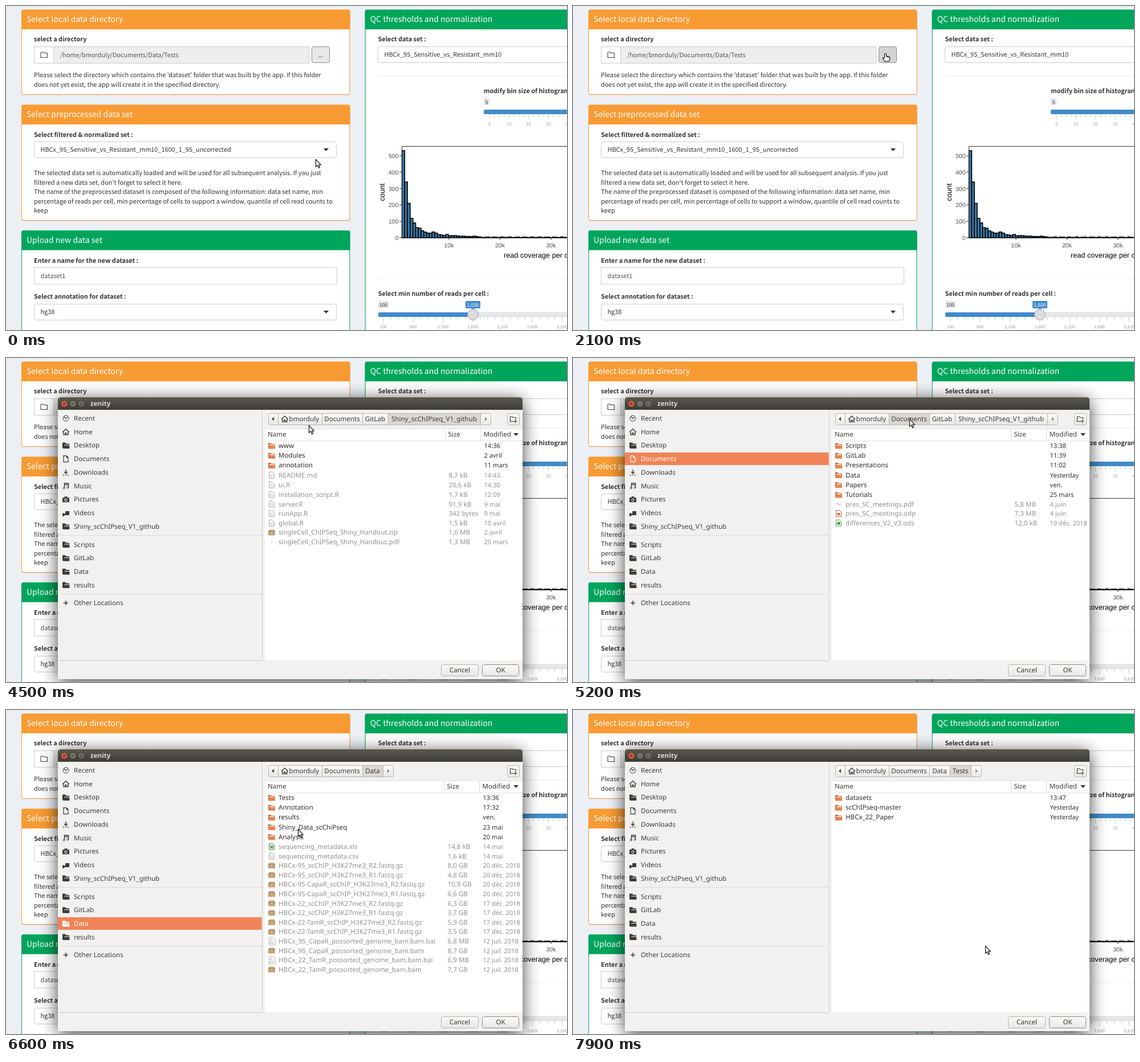
An HTML page that plays this animation: 984x569 px, repeating every 8 s.

```html
<!DOCTYPE html>
<html lang="en">
<head>
<meta charset="utf-8">
<style>
html, body { margin: 0; width: 100%; height: 100%; overflow: hidden; background: #ecf0f5; }
svg { display: block; width: 984px; height: 569px; }
text { white-space: pre; text-rendering: geometricPrecision; }
.web { font-family: "Noto Sans CJK JP", "Noto Sans CJK SC", "Noto Sans", sans-serif; font-size: 10.91px; fill: #333; }
.plot { font-family: "Liberation Sans", Arial, sans-serif; font-size: 10.5px; fill: #4d4d4d; }
.gtk { font-family: "Noto Sans", sans-serif; font-size: 11.6px; fill: #3c3b37; }
.shadow { filter: drop-shadow(0 5px 15px rgba(0, 0, 0, .75)); }
</style>
</head>
<body>
<svg viewBox="0 0 984 569">
  <defs>
    <linearGradient id="title" x2="0" y2="1"><stop stop-color="#5b5850"/><stop offset="1" stop-color="#3d3c38"/></linearGradient>
    <linearGradient id="button" x2="0" y2="1"><stop stop-color="#fbfaf9"/><stop offset="1" stop-color="#e9e7e5"/></linearGradient>
  </defs>
  <g id="page" class="web"></g>
  <g id="browse" class="web"></g>
  <g id="dialog" class="gtk"></g>
  <g id="cursor"></g>
</svg>
<script>
const $ = id => document.getElementById(id);
const USER = 'bmorduly';
const ORANGE = '#f89b33', GREEN = '#00a55c', BLUE = '#428bca', INK = '#3c3b37';

const rect = (x, y, w, h, fill, more = '') =>
  `<rect x="${x}" y="${y}" width="${w}" height="${h}" fill="${fill}" ${more}/>`;
const frame = (x, y, w, h, fill, stroke, r = 0) =>
  rect(x + .5, y + .5, w - 1, h - 1, fill, `stroke="${stroke}" rx="${r}"`);
const path = (d, fill, stroke = 'none', width = 1) =>
  `<path d="${d}" fill="${fill}" stroke="${stroke}" stroke-width="${width}"/>`;
const line = (d, stroke, width = 1) => path(d, 'none', stroke, width);
const circle = (x, y, r, fill, stroke = 'none') =>
  `<circle cx="${x}" cy="${y}" r="${r}" fill="${fill}" stroke="${stroke}"/>`;
// y is the visual middle of the line
const text = (x, y, s, style = '') => `<text x="${x}" y="${y + 4}" style="${style}">${s}</text>`;
const bold = (x, y, s) => text(x, y, s, 'font-weight:700');
const middle = (x, y, s, style = '') => text(x, y, s, 'text-anchor:middle;' + style);
const at = (x, y, s) => `<g transform="translate(${x} ${y})">${s}</g>`;

// ---------- web page ----------
const panel = (x, y, w, h, color, title) =>
  rect(x, y + 1, w, h, '#d9dde2', 'rx="3"') +
  frame(x, y, w, h, '#fff', color, 3) +
  path(`M${x} ${y + 34.5}v-31.5q0-3 3-3h${w - 6}q3 0 3 3v31.5z`, color) +
  text(x + 9, y + 17.2, title, 'font-size:14px;fill:#fff');

const selectBox = (x, y, s) =>
  frame(x, y, 531, 29, '#fff', '#ccc', 4) + text(x + 11.5, y + 14, s) +
  path(`M${x + 508} ${y + 12}h9l-4.5 5z`, '#333');

function slider(x, y, first, gap, labels) {
  let s = '';
  for (let i = 0; i < labels.length * 4; i++)
    s += line(`M${first + i * gap / 4} ${y + 4}v${i % 4 ? 5 : 9}`, '#b8bcc2', .8);
  labels.forEach((label, i) => s += middle(first + i * gap, y + 19.5, label, 'font-size:7.6px;fill:#999'));
  return s + rect(x, y - 4, 340, 8, BLUE, 'rx="2"');
}

const tag = (x, y, w, s) => rect(x, y, w, 12, '#e1e4e9', 'rx="2"') +
  middle(x + w / 2, y + 5.5, s, 'font-size:8.4px');

function histogram() {
  const counts = [531, 340, 210, 118, 90, 62, 58, 42, 34, 28, 28, 35, 28, 19, 17, 14, 20, 12, 13, 13, 11, 9, 10, 8, 8, 7, 10, 7];
  let s = '';
  for (let i = 0; i < 61; i++) {
    const n = counts[i] ?? 3 + 2 * Math.sin(i * 2.3);
    s += rect(694.5 + i * 4.8, 407 - n * .288, 4.8, n * .288, '#3a7aa9', 'stroke="#000" stroke-width="1.6"');
  }
  s += line('M994 246.5H694.5V407.5H994', '#333');
  for (let n = 0; n <= 500; n += 100)
    s += line(`M690 ${407 - n * .288}h4`, '#333') + text(688.5, 407 - n * .288, n, 'text-anchor:end');
  [1, 2, 3].forEach(k => s += line(`M${687.5 + k * 89.5} 407v4`, '#333') + middle(687.5 + k * 89.5, 420, k + '0k'));
  const axis = 'font-size:12.7px;fill:#000';
  return `<g class="plot">${s}${text(873, 437.5, 'read coverage per cell', axis)}
    <g transform="translate(660 327) rotate(-90)">${middle(0, 0, 'count', axis)}</g></g>`;
}

const prose = (y, lines) => lines.map((s, i) => text(49, y + i * 16.5, s)).join('');

$('page').innerHTML =
  rect(0, 0, 984, 569, '#ecf0f5') +
  panel(27, 6.5, 576.5, 149.3, ORANGE, 'Select local data directory') +
  bold(49, 58, 'select a directory') +
  frame(49, 71, 483, 30, '#eee', '#ccc') + frame(49, 71, 35, 30, '#fff', '#ccc') +
  path('M61 90.5v-8.5q0-1 1-1h3l1.5 1.5h5q1 0 1 1v7z', 'none', '#444', 1.1) +
  text(95, 86, `/home/${USER}/Documents/Data/Tests`, 'fill:#555') +
  prose(121, ["Please select the directory which contains the 'dataset' folder that was built by the app. If this folder",
    'does not yet exist, the app will create it in the specified directory.']) +

  panel(27, 173.6, 576.5, 203.3, ORANGE, 'Select preprocessed data set') +
  bold(49, 225.5, 'Select filtered &amp; normalized set :') +
  selectBox(49, 238, 'HBCx_95_Sensitive_vs_Resistant_mm10_1600_1_95_uncorrected') +
  prose(293, ['The selected data set is automatically loaded and will be used for all subsequent analysis. If you just',
    "filtered a new data set, don't forget to select it here.",
    'The name of the preprocessed dataset is composed of the following information: data set name, min',
    'percentage of reads per cell, min percentage of cells to support a window, quantile of cell read counts to',
    'keep']) +

  panel(27, 394.3, 576.5, 200, GREEN, 'Upload new data set') +
  bold(49, 446.5, 'Enter a name for the new dataset :') +
  frame(49, 459, 532, 30, '#fff', '#ccc') + text(60.5, 474, 'dataset1', 'fill:#555') +
  bold(49, 510, 'Select annotation for dataset :') + selectBox(49, 523, 'hg38') +

  panel(629.7, 6.5, 400, 600, GREEN, 'QC thresholds and normalization') +
  bold(652.5, 58, 'Select data set :') + selectBox(652, 71, 'HBCx_95_Sensitive_vs_Resistant_mm10') +
  line('M652 122.5H984M652 478.5H984', '#eee') +
  bold(838, 148.5, 'modify bin size of histogram') + tag(838, 162, 10, '5') +
  slider(838, 186, 848, 34.4, ['5', '15', '25', '35', '45']) +
  histogram() +
  bold(652.5, 505, 'Select min number of reads per cell :') + tag(653, 518, 18, '100') +
  slider(653, 542, 662, 52.25, ['100', '600', '1,100', '1,600', '2,100', '2,600', '3,100']) +
  rect(819, 538, 170, 8, '#e6e7e9', 'stroke="#d0d0d0" stroke-width=".6"') +
  rect(806, 518, 26, 13, BLUE, 'rx="2"') + path('M816.5 531h5l-2.5 3z', BLUE) +
  middle(819, 524, '1,600', 'font-size:8.6px;fill:#fff') +
  circle(819, 542, 9.5, '#dcdcdc', '#a5a5a5');

const browseButton = hover =>
  frame(536, 71, 32, 29, hover ? '#d4d4d4' : '#e7e7e7', '#8c8c8c', 3) + middle(552, 85.5, '...');

// ---------- file chooser ----------
const icons = {
  folder: c => path('M-6 5v-10h5l1.5 2h5.5v2h-8.5l-1.5 6z', c) + path('M-4.5 5.5l1.2-5.5h9.7v5.5z', c),
  clock: c => circle(0, 0, 5, 'none', c) + line('M-3-3L0 .5L3-2', c, 1.2),
  home: c => line('M-6 .5L0-5L6 .5M-4 0v5h3v-3h2v3h3v-5', c, 1.4),
  page: c => path('M-4-5.5h5l3 3v8h-8zM1-5.5v3h3', 'none', c, 1.2),
  down: c => line('M0-5v7M-3-1L0 2.2L3-1', c, 1.4) + path('M-5 4h2v1.5h-2zM-1 4h2v1.5h-2zM3 4h2v1.5h-2z', c),
  note: c => line('M-2.5 4v-8.5h7v7.5M-2.5-2h7', c, 1.4) + circle(-3.5, 4, 1.5, 'none', c) + circle(3.3, 3, 1.5, 'none', c),
  camera: c => path('M-6-3h3l1-2h4l1 2h3v8h-12z', c) + circle(0, 1, 2.2, c, '#fff'),
  video: c => path('M-1-3h7v7h-7l-5 2.5v-6h2l3 1.5z', c),
  plus: c => line('M-4 0h8M0-4v8', c, 1.4),
};
const sheet = (fill, stroke) => path('M-4.5-5.5h6l3 3v8h-9z', fill, stroke, .9);
const fileIcons = {
  dir: () => path('M-6 5v-9.5h4.5l1 1.5h6v8z', '#b9623c') + rect(-4.5, -2.2, 9, 2, '#f3e6df') +
    path('M-6 5.500v-4.500h4l1.500-1.500h6.500v6z', '#ef8249'),
  txt: () => sheet('#f6f6f6', '#a9a9a9') + line('M-3-1h5M-3 1h6M-3 3h6', '#ccc', .7),
  zip: () => path('M-6 5v-7l1.5-3h9l1.5 3v7z', '#c3a277') + rect(-6, -2, 12, 1, '#9d7c52') + rect(-1.5, -1, 3, 1.5, '#e6d5b8'),
  pdf: () => line('M0-2v5', '#cdd0dc', 1.2),
  pre: () => rect(-5.5, -3, 11, 7, '#f1f3f5') + line('M-4-1h4M-1 1h4', '#a9bccb'),
  odp: () => sheet('#fff', '#b5552b') + rect(-2.5, -1, 5, 4, '#c76a3e'),
  ods: () => sheet('#fff', '#3b9b3f') + rect(-2.5, -2, 5, 5, '#3b9b3f'),
  xls: () => sheet('#dcebdc', '#4d8a50') + line('M-2.5-2l5 5m0-5l-5 5', '#3c7a40', 1.2),
  bai: () => path('M-5-7h8l3.500 3v11h-11.500z', '#f1f1f1', '#bbb', .8) + line('M-2-3v3M-3 2v3M1 2v3', '#888'),
};

const places = [['Recent', 'clock'], ['Home', 'home'], ['Desktop', 'folder'], ['Documents', 'page'], ['Downloads', 'down'],
  ['Music', 'note'], ['Pictures', 'camera'], ['Videos', 'video'], ['Shiny_scChIPseq_V1_github', 'folder'],
  ['Scripts', 'folder'], ['GitLab', 'folder'], ['Data', 'folder'], ['results', 'folder'], ['Other Locations', 'plus']];

// Rows are "kind|name|size|modified".
const rows = s => s.trim().split('\n').map(r => r.trim().split('|'));
const trail = [['Documents', 554, 625], ['GitLab', 625, 670], ['Shiny_scChIPseq_V1_github', 670, 832]];
const dataTrail = [trail[0], ['Data', 625, 661]];
const views = [
  { trail, active: 2, sizeX: 776.5, dateX: 838.5, rows: rows(`
    dir|www||14:36
    dir|Modules||2 avril
    dir|annotation||11 mars
    txt|README.md|8,7 kB|14:43
    txt|ui.R|20,6 kB|14:30
    txt|installation_script.R|1,7 kB|12:09
    txt|server.R|91,9 kB|9 mai
    txt|runApp.R|342 bytes|9 mai
    txt|global.R|1,5 kB|10 avril
    zip|singleCell_ChIPSeq_Shiny_Handout.zip|1,6 MB|2 avril
    pdf|singleCell_ChIPSeq_Shiny_Handout.pdf|1,3 MB|25 mars`) },
  { trail, active: 0, place: 'Documents', pick: 3, pickColor: '#eb6c3b', rows: rows(`
    dir|Scripts||13:38
    dir|GitLab||11:39
    dir|Presentations||11:02
    dir|Data||Yesterday
    dir|Papers||ven.
    dir|Tutorials||25 mars
    pre|pres_SC_meetings.pdf|5,8 MB|4 juin
    odp|pres_SC_meetings.odp|7,3 MB|4 juin
    ods|differences_V2_V3.ods|12,0 kB|19 déc. 2018`) },
  { trail: dataTrail, active: 1, place: 'Data', pick: 0, pickColor: '#f27c48', rows: rows(`
    dir|Tests||13:36
    dir|Annotation||17:32
    dir|results||ven.
    dir|Shiny_Data_scChiPseq||23 mai
    dir|Analysis||20 mai
    xls|sequencing_metadata.xls|14,8 kB|14 mai
    txt|sequencing_metadata.csv|1,6 kB|14 mai
    zip|HBCx-95_scChIP_H3K27me3_R2.fastq.gz|8,0 GB|20 déc. 2018
    zip|HBCx-95_scChIP_H3K27me3_R1.fastq.gz|4,8 GB|20 déc. 2018
    zip|HBCx-95-CapaR_scChIP_H3K27me3_R2.fastq.gz|10,9 GB|20 déc. 2018
    zip|HBCx-95-CapaR_scChIP_H3K27me3_R1.fastq.gz|6,6 GB|20 déc. 2018
    zip|HBCx-22_scChIP_H3K27me3_R2.fastq.gz|6,3 GB|17 déc. 2018
    zip|HBCx-22_scChIP_H3K27me3_R1.fastq.gz|3,7 GB|17 déc. 2018
    zip|HBCx-22-TamR_scChIP_H3K27me3_R2.fastq.gz|5,9 GB|17 déc. 2018
    zip|HBCx-22-TamR_scChIP_H3K27me3_R1.fastq.gz|3,5 GB|17 déc. 2018
    bai|HBCx_95_CapaR_possorted_genome_bam.bam.bai|6,8 MB|12 juil. 2018
    zip|HBCx_95_CapaR_possorted_genome_bam.bam|8,7 GB|12 juil. 2018
    bai|HBCx_22_TamR_possorted_genome_bam.bam.bai|6,9 MB|12 juil. 2018
    zip|HBCx_22_TamR_possorted_genome_bam.bam|7,7 GB|12 juil. 2018`) },
  { trail: [...dataTrail, ['Tests', 661, 698]], active: 2, rows: rows(`
    dir|datasets||13:47
    dir|scChIPseq-master||Yesterday
    dir|HBCx_22_Paper||Yesterday`) },
];

const EDGE = '#b8b3ac';
const pushButton = (x, w, s, stroke) => frame(x, 538, w, 21, 'url(#button)', stroke, 3) + middle(x + w / 2, 548, s);

const chrome =
  rect(91, 69, 815, 495, '#f2f1f0', 'rx="5" class="shadow"') +
  path('M91 91v-17q0-5 5-5h805q5 0 5 5v17z', 'url(#title)') + rect(91, 91, 815, 473, '#f2f1f0') +
  circle(102.3, 80.3, 5.7, '#e9603a', '#3a3935') + line('M100 78l4.6 4.6m0-4.6l-4.6 4.6', '#5b2414', 1.2) +
  circle(117.5, 80.3, 5.5, '#7b786f', '#3a3935') + line('M115 80.3h5', INK, 1.2) +
  circle(132.2, 80.3, 5.5, '#7b786f', '#3a3935') + frame(130, 78, 5, 5, 'none', INK) +
  text(148, 80, 'zenity', 'font-weight:700;fill:#dfdbd2') +
  rect(454, 124, 452, 407, '#fff') +
  line('M449.5 91V531M91 531.5H449', '#cfccc8') + line('M91 311.5H448M91 414.5H448', '#dedbd8') +
  line('M454 145.5H906M454 124.5H906', '#e4e2df') +
  frame(879, 97, 22, 21, 'url(#button)', EDGE, 3) +
  line('M891 111.5h-6.5v-8.5h4l1 1.5h5v3M893.5 108v6M890.5 111h6', INK, 1.2) +
  pushButton(763, 66, 'Cancel', EDGE) + pushButton(835, 65, 'OK', '#8f8a83');

function sidebar(active) {
  return places.map(([name, icon], i) => {
    const y = 106 + i * 23.7 + (i > 8) * 8.2 + (i > 12) * 8;
    const on = name === active, color = on ? '#fff' : INK;
    return (on ? rect(91, Math.round(y - 11), 357.5, 22, '#f08357') : '') +
      at(105, y, icons[icon](color)) + text(119, y, name, `fill:${color}`);
  }).join('');
}

function breadcrumbs({ trail, active }, shade) {
  const end = trail.at(-1)[2];
  return frame(460, 97, end - 441, 21, 'url(#button)', EDGE, 3) +
    trail.map(([name, x, right], i) => {
      const fill = i === active ? '#dad7d4' : i === 0 && shade;
      return (fill ? rect(x, 98, right - x, 19, fill) : '') +
        line(`M${x + .5} 98v19M${right + .5} 98v19`, EDGE) + middle((x + right) / 2, 107, name);
    }).join('') +
    line('M477.5 98v19', EDGE) + path('M470 103.5v7l-4-3.5z', INK) +
    path(`M${end + 8} 103.5v7l4-3.5z`, '#8f8b86') +
    at(489, 107, icons.home(INK)) + text(496.5, 107, USER);
}

// The upper rows stand slightly wider apart.
const rowY = i => 154 + 17.2 * Math.min(i, 5) + 16.6 * Math.max(i - 5, 0);

function fileList({ rows, pick, pickColor, sizeX = 774.5, dateX = 836.5 }, picked) {
  return line(`M${sizeX - 6} 125v20M${dateX - 6} 125v20`, '#dcdad7') +
    text(459, 134, 'Name') + text(sizeX - 1, 134, 'Size') + text(dateX - 1, 134, 'Modified') +
    path('M890 132h9l-4.5 5z', INK) +
    rows.map(([kind, name, size, date], i) => {
      const y = rowY(i), on = picked && i === pick;
      const style = `fill:${on ? '#fff' : kind === 'dir' ? '#2f2e2b' : '#92918e'}`;
      return (on ? rect(454, Math.round(y - 8.5), 452, 17, pickColor) : '') +
        at(466, y, fileIcons[kind]()) + text(478, y, name, style) +
        text(sizeX, y, size, style) + text(dateX, y, date, style + ';font-size:11.1px');
    }).join('');
}

// ---------- pointer and timeline ----------
const arrow = path('M.5 .5v12.800l2.900-2.600 2.100 4.700 2-.9-2-4.500h3.700z', '#fff', '#000', 1.1);
const hand = path('M-1.5 7V.5q1.5-2 3 0V4.5q4-.5 6 1.5v4l-1.5 3h-6.500l-4-4.500q-.5-2 1.5-1z', '#fff', '#000', 1.1) +
  line('M3.3 5v2M5.3 5.5v2', '#000', .8);

const route = [[0, 543, 269], [100, 543, 269], [500, 529, 190], [1000, 548, 84], [3200, 548, 84], [3300, 546, 84],
  [4100, 400, 192], [4500, 531, 118], [4700, 590, 107], [5400, 590, 107], [5600, 540, 151], [5900, 540, 151],
  [6100, 512, 209], [6800, 512, 209], [7300, 520, 152], [7400, 520, 152], [7900, 723, 414], [8000, 723, 414]];

function pointerAt(t) {
  const i = route.findIndex(([end]) => end > t);
  const [t0, x0, y0] = route[i - 1], [t1, x1, y1] = route[i];
  const k = (t - t0) / (t1 - t0);
  return [x0 + (x1 - x0) * k, y0 + (y1 - y0) * k];
}

let shown = -1;
function draw(now) {
  requestAnimationFrame(draw);
  const t = Math.floor(now % 8000 / 100) * 100;
  if (t === shown) return;
  shown = t;

  const view = views[[3300, 5200, 6600, 7500].filter(start => t >= start).length - 1];
  const [x, y] = pointerAt(t);
  const overButton = !view && y < 100;
  $('browse').innerHTML = browseButton(overButton);
  const shade = t >= 5000 ? '#d3d0cc' : t >= 4700 ? '#faf9f8' : '';
  const picked = t >= 7300 || t >= 6100 && t < 6600;
  $('dialog').innerHTML = view
    ? chrome + sidebar(view.place) + breadcrumbs(view, t < 5200 && shade) + fileList(view, picked) : '';
  $('cursor').innerHTML = at(x, y, overButton ? hand : arrow);
}
requestAnimationFrame(draw);
</script>
</body>
</html>
```
